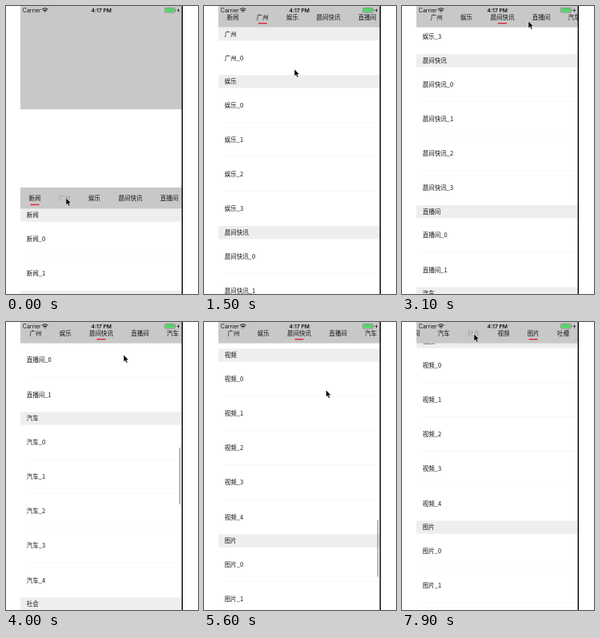
Write an HTML page that moves like this. It is 240 px wide and 360 px high and loops after 8 s.

```html
<!DOCTYPE html>
<html lang="zh">
<head>
<meta charset="utf-8">
<style>
  html, body { margin: 0; width: 100%; height: 100%; overflow: hidden; background: #fff; }
  svg { display: block; width: 240px; height: 360px; }
  text { font: 500 7.5px "Noto Sans CJK SC", "Noto Sans CJK", sans-serif; fill: #111; }
  .status { font: 400 7px Inter, sans-serif; }
  .clock { font-weight: 600; font-size: 6.7px; }
  .mid { text-anchor: middle; }
  .pressed { fill: #9a9a9a; }
</style>
</head>
<body>
<svg viewBox="0 0 240 360">
  <clipPath id="screen"><rect x="18" width="202" height="360"/></clipPath>
  <g clip-path="url(#screen)">
    <g id="list"><rect x="18" y="-253.4" width="202" height="129.2" fill="#c8c8c8"/></g>
    <rect id="thumb" x="216.7" width="1.1" height="71" rx=".5" fill="#858585"/>
    <g id="bar">
      <rect x="18" width="202" height="26.6" fill="#c8c8c8"/>
      <g id="tabs"><rect id="line" x="-5.5" y="20.9" width="11" height="1.4" fill="#e0203c"/></g>
    </g>
    <text class="status" x="20.8" y="7.6">Carrier</text>
    <g fill="none" stroke="#111" stroke-width="1.1">
      <path d="M45 4.4Q48.7 1.2 52.4 4.4M46.5 6Q48.7 4.2 50.9 6"/>
      <path d="M48 6.9L48.7 7.8 49.4 6.9Z" fill="#111" stroke-width=".4"/>
    </g>
    <text class="status clock mid" x="119.2" y="7.6">4:17 PM</text>
    <rect x="198.6" y="2.4" width="12.6" height="5.8" rx="1.2" fill="none" stroke="#555" stroke-width=".5"/>
    <rect x="199.3" y="3.1" width="11.2" height="4.4" rx=".6" fill="#4cd964"/>
    <rect x="211.7" y="4.3" width=".8" height="2" rx=".4" fill="#555"/>
    <path d="M216.1 2.8L213.9 5.7H215.3L214.8 8 217.1 4.9H215.6Z" fill="#111"/>
  </g>
  <rect x="219.6" width="1.4" height="360" fill="#000"/>
  <path id="cursor" d="M0 0V8.8L2 7 3.5 10.3 5 9.6 3.6 6.5H6.3Z" fill="#000" stroke="#fff" stroke-width=".5"/>
</svg>
<script>
const LOOP = 8000, STEP = 100;
const HEAD = 16.2, ROW = 43.15, BAR = 26.6, START = 253.4;
const LEFT = 18, RIGHT = 220, GLYPH = 7.5, GAP = 22.3;
const DRAG = 3790, RELEASE = 3900, REST = 6430;
const $ = id => document.getElementById(id);

// Name and row count
const sections = [
  ['新闻', 2], ['广州', 1], ['娱乐', 4], ['晨间快讯', 4], ['直播间', 2],
  ['汽车', 5], ['社会', 3], ['视频', 5], ['图片', 3], ['吐槽', 3]
];
// Tab, press, release; the fourth is selected by the resting list
const picks = [[1, 0, 1000], [2, 1900, 2000], [3, 2800, 2880], [8, 6450, 6450], [6, 7800, LOOP]];
// Start, end, x, y
const moves = [
  [1150, 1500, 113, 79], [1500, 1850, 110, 14], [2100, 3100, 158, 19],
  [3100, 3600, 147, 41], [5000, 5600, 152.5, 85], [6400, 7600, 90, 15]
];

function add(parent, tag, attrs, text) {
  const el = document.createElementNS('http://www.w3.org/2000/svg', tag);
  for (const k in attrs) el.setAttribute(k, attrs[k]);
  if (text) el.textContent = text;
  return $(parent).appendChild(el);
}

let y = 0, x = 28.5;
const tabs = sections.map(([name, rows]) => {
  const top = y, width = name.length * GLYPH, mid = x + width / 2;
  add('list', 'rect', { x: LEFT, y, width: RIGHT - LEFT, height: HEAD, fill: '#eee' });
  add('list', 'text', { x: 25.8, y: y + HEAD / 2 + 2.8 }, name);
  y += HEAD;
  for (let i = 0; i < rows; i++, y += ROW) {
    add('list', 'text', { x: 25.8, y: y + ROW / 2 + 2.8 }, name + '_' + i);
    if (i < rows - 1) add('list', 'rect', { x: 26, y: y + ROW - .5, width: 194, height: .5, fill: '#eee' });
  }
  x += width + GAP;
  return { top, mid, label: add('tabs', 'text', { x: mid, y: 16.5, class: 'mid' }, name) };
});
const maxShift = x - GAP + 11 - RIGHT;

const clamp = (v, lo = 0, hi = 1) => Math.max(lo, Math.min(hi, v));
const smooth = p => p * p * (3 - 2 * p);
const mix = (a, b, p) => a + (b - a) * p;

// Eases from one picked tab's value to the next
const follow = (t, first, value, time) => picks.reduce(
  (v, [tab, , up]) => mix(v, value(tabs[tab]), smooth(clamp((t - up) / time))), first);

const stop = tab => BAR + .4 - tab.top;
const shift = tab => -clamp(tab.mid - 119, 0, maxShift);

// Flick with exponential slowdown
const fling = t => -1007.3 + 477.75 * Math.exp((4000 - Math.min(t, REST)) / 513.7);

function listY(t) {
  if (t < DRAG) return follow(t, START, stop, 300);
  if (t > RELEASE) return fling(t);
  return mix(stop(tabs[3]), fling(RELEASE), (t - DRAG) / (RELEASE - DRAG));
}

const pointer = t => moves.reduce(([px, py], [from, to, mx, my]) => {
  const p = clamp((t - from) / (to - from));
  return [mix(px, mx, p), mix(py, my, p)];
}, [75, 240]);

const move = (id, x, y) => $(id).setAttribute('transform', `translate(${x} ${y})`);

function draw(t) {
  const pos = listY(t);
  move('list', 0, pos);
  move('bar', 0, Math.max(0, pos - BAR));
  move('tabs', follow(t, 0, shift, 300), 0);
  move('line', follow(t, tabs[0].mid, tab => tab.mid, 200), 0);
  move('cursor', ...pointer(t));
  $('thumb').setAttribute('y', 51.6 - pos * .199);
  $('thumb').setAttribute('opacity', t < DRAG ? 0 : 1 - clamp((t - REST) / 270));
  tabs.forEach(({ label }, i) => label.classList.toggle('pressed',
    picks.some(([tab, down, up]) => tab === i && t >= down && t < up)));
}

const begin = performance.now();
function tick() {
  const t = (performance.now() - begin) % LOOP;
  draw(Math.floor(t / STEP) * STEP);
  requestAnimationFrame(tick);
}
tick();
</script>
</body>
</html>
```
